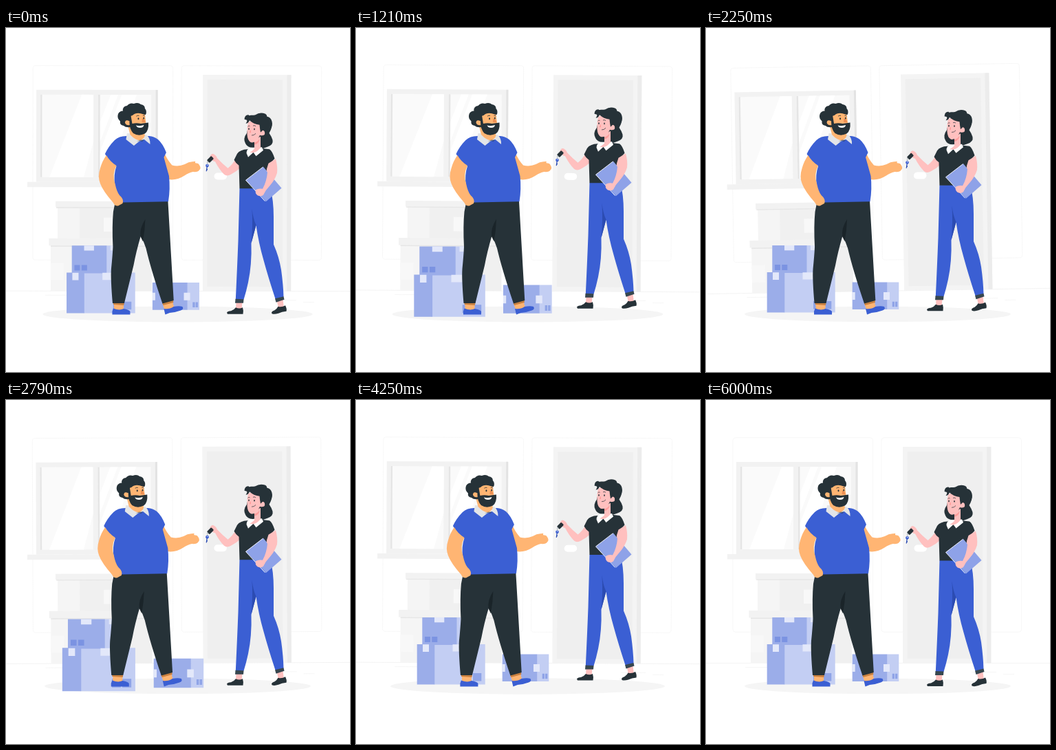
Write an HTML page that moves like this. It is 500 px wide and 500 px high and loops after 6.04 s.

```html
<!DOCTYPE html>
<html lang="en">
<head>
<meta charset="utf-8">
<title>Handing over the keys</title>
<style>
  html, body { margin: 0; width: 100%; height: 100%; overflow: hidden; background: #fff; }
  svg { display: block; width: 100vw; height: 100vh; }
</style>
</head>
<body>
<svg viewBox="0 0 500 500">
  <g id="room">
    <g fill="none" stroke="#f4f4f4" stroke-width=".7">
      <rect x="39" y="54.800" width="203.500" height="282.500" rx="4"/>
      <rect x="255" y="54.800" width="203.500" height="282.500" rx="4"/>
    </g>
    <path d="M0 382.400H500" stroke="#ebebeb" stroke-width=".6"/>
    <path d="M432 398.500h16M386 395.500h36M57 388.500h33M100 391h20" stroke="#f0f0f0" stroke-width=".6"/>

    <g id="window">
      <path d="M44 90H220.500V224H44Z" fill="#f2f2f2"/>
      <path d="M217.500 90h3V224h-3Z" fill="#e3e3e3"/>
      <path d="M31 224H229V231.500H31Z" fill="#f2f2f2"/>
      <path d="M50 97H127V217H50ZM134 97H211V217H134Z" fill="#fafafa"/>
      <path d="M110 97H127V165L113 217H63ZM152 97H163L136 167V138ZM168 97H190L146 217H136V181Z" fill="#fff"/>
      <path d="M50 97h2.300V217H50ZM134 97h2.500V217H134Z" fill="#e5e5e5"/>
    </g>

    <g id="door">
      <path d="M286 68H414.300V382.500H286Z" fill="#f4f4f4"/>
      <path d="M408.300 68h6V382.500h-6Z" fill="#ececec"/>
      <path d="M292.500 75H402V376H292.500Z" fill="#efefef"/>
      <rect x="302.500" y="210.500" width="18.500" height="10" rx="5" fill="#fff"/>
    </g>

    <g id="crates">
      <path d="M75 259H200V307H75ZM65 316H212V382.300H65Z" fill="#f5f5f5"/>
      <path d="M107 259H200V307H107ZM112 316H212V382.300H112Z" fill="#f0f0f0"/>
      <path d="M72 252H203V260.500H72ZM62.500 306H214V316.500H62.500Z" fill="#f2f2f2"/>
      <path d="M73 260.500H203v1.300H73ZM65 316.500H212v1.500H65Z" fill="#e6e6e6"/>
      <path d="M142 275.500h14v20.500h-14ZM65 342H84V367H65Z" fill="#f8f8f8"/>
    </g>
  </g>

  <ellipse id="shadow" cx="249.500" cy="416" rx="193.500" ry="11.300" fill="#f5f5f5"/>

  <g id="boxes">
    <path d="M146 316H166V356H146ZM113.500 355H187.700V413.600H113.500ZM263 369.400h17.300V409H263Z" fill="#c3cef3"/>
    <path d="M96.300 316H146.500V356H96.300ZM88.700 355H114.300V413.600H88.700ZM212.700 369.400H263.200V409H212.700Z" fill="#9bade9"/>
    <path d="M114 316h14.300v7.300H114ZM152 316h9v7h-9ZM97 355.300h9v10.700h-9ZM140.500 355.300H156v10.300H140.500ZM258 384h9v11h-9ZM212.700 384h4v11h-4Z" fill="#e3e8fa"/>
    <path d="M100 344h8v8h-8ZM110.300 344h8v8h-8Z" fill="#7b93e2"/>
    <path d="M156 397h12v11.500H156ZM170 397h12.300v11.500H170ZM270.700 397.700h3.300v7.500h-3.300ZM275 397.700h3.300v7.500H275Z" fill="#8fa4e7"/>
  </g>

  <g id="man">
    <path d="M157 401L171 402.500V411H157ZM227.500 400L242 397L244.500 407L231 411Z" fill="#ffb573"/>
    <path d="M156 399H172L171.500 403L156 402ZM227 399.500L243 395.500L243.500 399L228.500 403Z" fill="#c9803f"/>
    <path d="M156 407.500Q165 411 171 408Q179 409.500 180.500 412V416.500H154.500Q154 411 156 407.500ZM229.500 408Q238 409 243.500 405Q252 403.500 256.500 405Q259 408.500 254 410.500Q246 413.500 238 414L231.500 416.500Z" fill="#3b5fd3"/>
    <path d="M159 252H235.500L243.800 396L227.500 400.500Q211 352 203.500 320Q201 311 195.700 303Q189 326 185.500 345L172 400H155Q152 365 153 350Q155 330 155.500 318Q154 288 156 267Z" fill="#263238"/>
    <path d="M202.500 278Q194 291 195.700 303L199 310Q202 294 202.500 278Z" fill="#1a2429"/>
    <path d="M230 181Q234 191 241.500 199.500Q251 202 260 198Q266 194 272 194.300L275.500 193.800Q274 196.300 276.500 196.500Q280 196 281 199Q284.500 204 281 206.500Q279 209.800 272 209Q266 210 259.500 214.500Q248 222 236 220L228 192Z" fill="#ffb573"/>
    <path d="M175 157Q164 157 158 163Q149 172 144 183Q150 195 160.500 201Q156 213 158.500 230Q157 240 158 253.800L236 252.300Q239 234 237 215L229.500 188L233 181Q228 168 221 162Q215 157.500 208 157Z" fill="#3b5fd3"/>
    <path d="M146 185Q151 194 160.500 200Q154 213 158.500 226Q161 238 165 243Q172 249 169.500 255L163 258.500Q158 259 156 254Q141 237 137 226Q133 216 137 204Q140 193 146 185Z" fill="#ffb573"/>
    <path d="M176 153L174.500 162L186 171L194 164.500L201 162L209.500 169Q210 160 204 155Z" fill="#e3e5e8"/>
    <path d="M177 141L180.500 155Q188 163 195 163.500Q201 161 202 156L199 148Z" fill="#ffb573"/>
    <path d="M190 165L195 162.500L201 162.500L198 165L195 164Z" fill="#263238" opacity=".5"/>
    <path d="M181 144Q174 145 171 142Q165 141 166 135.500Q161 131 163 125Q165 120.500 170 120.500Q169 114 176 113Q180 108 186 110Q192 107.500 196 111Q202 112 202 117Q205.500 121 203 126L190 128Z" fill="#263238"/>
    <path d="M181 129Q183 122 190 122Q199 122 202 126L204 141L197 149H183L180 141Q174 142 173 137.500Q173.500 133 177.500 134.500L181 136Z" fill="#ffb573"/>
    <path d="M181 124L183.500 139Q190 137.500 196 139L207 137.500Q208 149 202 153.500Q193 158 185 153Q179.500 147 179.500 137Z" fill="#263238"/>
    <path d="M181 128Q184 119 193 120Q200 121 203 120Q204 127 200 125.500Q190 121.500 184 127Z" fill="#263238"/>
    <path d="M189 141.500Q195 143 200.500 141Q200 145 195 145Q190.500 145 189 141.500Z" fill="#fff"/>
    <path d="M189.500 128.300Q191.500 126.500 193.500 127.500M199 127.500Q200.500 126.500 202 128" fill="none" stroke="#263238" stroke-width=".8"/>
    <path d="M198 131Q203 134 202.500 137L197.500 137Z" fill="#ed8f53"/>
    <ellipse cx="192.500" cy="131.700" rx="1" ry="1.500" fill="#263238"/>
    <ellipse cx="200.300" cy="131" rx=".9" ry="1.500" fill="#263238"/>
  </g>

  <g id="woman">
    <path d="M334.500 399H343.500L342.500 409H334ZM393.500 396L402.500 395L404 407H396Z" fill="#ffc0bf"/>
    <path d="M321 414Q322 411.500 327 411.500Q332 409.500 334 406.500Q339 409 344 406.500Q345.500 411 344.500 416H322ZM386 413.500Q387 411.500 390.500 410.500Q394 408 395.500 405Q401 406.500 406 403.500Q408.500 408 407.500 412Q401 412.500 396 415Q390 417 386.500 415.500Z" fill="#263238"/>
    <path d="M339.500 233L384 232Q389 250 389 275L389 315Q397 333 400 352Q403 374 403.500 391L391.500 394Q381 362 374.500 338Q367 312 363.500 287L356.500 313Q357.500 344 352 370Q349 384 345.500 395H333.800Q336 350 337.500 310Z" fill="#3b5fd3"/>
    <path d="M357.500 263Q359 277 363.500 287L356.500 313Q359 288 357.500 263Z" fill="#2c4cb2"/>
    <path d="M333.500 394L345.500 394.500L345 400H333ZM391 393.500L403.500 390.500L404.500 395L392.500 399Z" fill="#37474f"/>
    <path d="M357 133Q351 147 350 153Q344 161 348 168Q351 175 361 174Q369 178 380 173Q389 170 387.500 163Q386 158 382.500 153Q388 144 386 137L376 128Z" fill="#263238"/>
    <path d="M335 189Q329 199 322.500 204Q315 198 307 189.500Q305 184 300 183Q296.500 184.500 296 189L299.500 192Q301 194 304 194.500Q310 206 317 213Q321 216.500 327 213Q335 209 341 203Z" fill="#ffc0bf"/>
    <path d="M351 176.500Q340 177 336 183L331.500 192Q334 197 338.500 200L339.500 233.500H383Q381 215 381.500 200L390.500 190Q387 179 383 176.500L370 175Z" fill="#263238"/>
    <path d="M349.500 182Q349.500 177 354 174.500L372 173.500L374 178L363.500 186.500L359.500 181L352 188Z" fill="#fff"/>
    <path d="M361 163V176Q358 179 354 181L359.500 181.500Q366 180 370 174V158Z" fill="#ffc0bf"/>
    <path d="M361 167Q366 165.500 369 161Q368 168 361 170Z" fill="#ff9d9c"/>
    <path d="M352 137Q350 145 350.500 155Q351 164 356 166.500Q364 168 369 156Q376 158 377 152Q377 147 372 148L368 134Z" fill="#ffc0bf"/>
    <path d="M346.500 133Q347 126 352.500 126.500Q353 128 356 127Q361 127 362.500 126.500Q369 122 377 125Q379 126 379.500 129Q385 130 386.500 136Q388 142 384 148L376 156Q377 149 373 149L370 152Q369 147 368.500 141Q360 140 354 134.500Q352 139 348.500 139Q351 136 350 134Z" fill="#263238"/>
    <path d="M351.500 143.500Q353 141.500 354.500 143M359 142.500Q361 141 363 143M357 156.300Q361 156.500 363 153.500" fill="none" stroke="#263238" stroke-width=".7"/>
    <path d="M356 148Q353.500 151 354 152.500H356Z" fill="#ff9d9c"/>
    <ellipse cx="353" cy="147" rx=".8" ry="1.400" fill="#263238"/>
    <ellipse cx="361" cy="147.300" rx=".8" ry="1.400" fill="#263238"/>
    <path d="M374 202L400.500 233L378 252.500L348.500 221.500Z" fill="#8ea2e8"/>
    <path d="M373.500 202.300L348.500 221.500L376.500 252" fill="none" stroke="#f3f5fd" stroke-width="1"/>
    <path d="M381.500 197L392 190.500Q395 201 394 211Q391 221 383 230Q377 236 374 243Q370 246 365.500 243.500Q361.500 240 363 235.500Q367 233 373 234Q379 223 380 210Q378 208 379 205Z" fill="#ffc0bf"/>
    <rect x="-4.500" y="-2.800" width="9" height="5.600" rx="1.300" fill="#263238" transform="translate(297 191.300) rotate(-45)"/>
    <path d="M294.500 194Q292 193.500 292.500 196.500L292.800 199" fill="none" stroke="#8795a0" stroke-width=".6"/>
    <circle cx="292.500" cy="200.300" r="2.300" fill="#3b5fd3"/>
    <circle cx="292.700" cy="199.500" r=".7" fill="#fff"/>
    <path d="M292.200 202L291.300 208.500M291.800 206H293" fill="none" stroke="#2c4cb2" stroke-width="1.300"/>
  </g>
</svg>
<script>
  const LOOP = 6040, SPAN = 6000, LEAD = 40;

  // Each track is a list of [percent, value] pairs joined linearly.
  const sway = [[0, 0], [25, 1], [75, -1], [100, 0]];
  const float = [[0, 0], [50, -10], [100, 0]];
  const beat = [[0, 1], [10, 1.1], [30, 1], [40, 1], [50, 1.1], [60, 1], [100, 1]];
  const shake = [[0, 0], [10, -1], [20, 2], [30, -4], [40, 4], [50, -4],
                 [60, 4], [70, -4], [80, 2], [90, -1], [100, 0]];

  function sample(track, time, period) {
    const percent = (time % period) / period * 100;
    const i = track.findIndex(([p]) => p > percent);
    const [p0, v0] = track[i - 1], [p1, v1] = track[i];
    return v0 + (v1 - v0) * (percent - p0) / (p1 - p0);
  }

  const part = id => document.getElementById(id);
  const [room, shadow, boxes, man, woman] = ['room', 'shadow', 'boxes', 'man', 'woman'].map(part);
  const move = (el, value) => el.setAttribute('transform', value);
  const scaleAt = (x, y, s) => `translate(${x} ${y}) scale(${s}) translate(${-x} ${-y})`;

  function draw(clock) {
    const t = Math.min(clock % LOOP + LEAD, SPAN);
    move(room, `rotate(${sample(sway, t, 3000)} 250 250)`);
    move(shadow, scaleAt(249.5, 416, sample(beat, t, 3000)));
    move(boxes, scaleAt(184.5, 281, sample(beat, t, 6000)));
    move(man, `translate(${sample(shake, t, 6000)} 0)`);
    move(woman, `translate(0 ${sample(float, t, 3000)})`);
  }

  const start = performance.now();
  function tick() {
    draw(performance.now() - start);
    requestAnimationFrame(tick);
  }
  tick();
</script>
</body>
</html>
```
